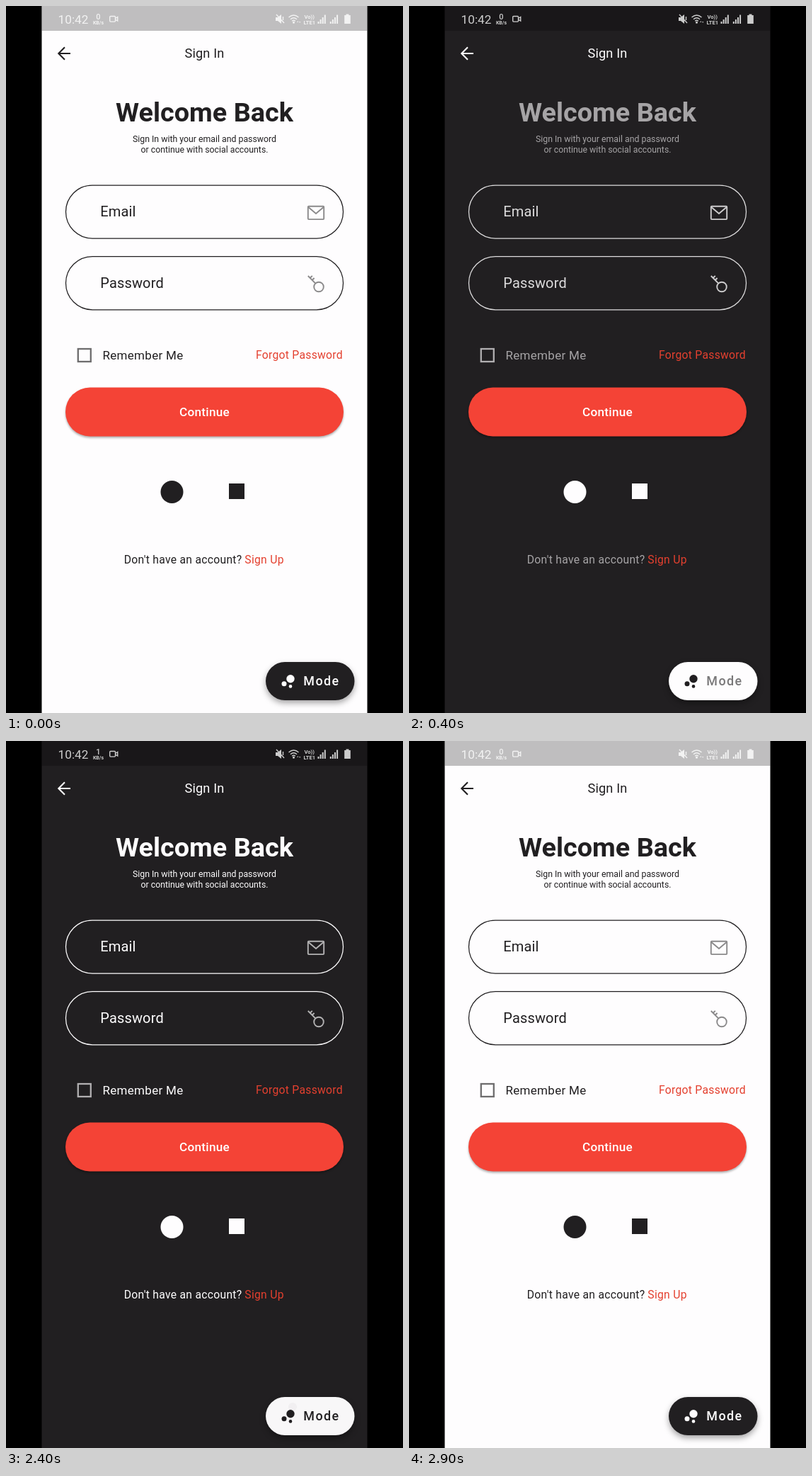
Recreate the animation shown at these times as an HTML page. Size 561x998 px, loop 4.2 s.

```html
<!DOCTYPE html>
<html lang="en">
<head>
<meta charset="utf-8">
<title>Sign In</title>
<style>
  html, body { margin: 0; width: 100%; height: 100%; overflow: hidden; background: #000; }
  svg { display: block; width: 561px; height: 998px; font-family: Roboto, sans-serif; }
  .mid { text-anchor: middle; }
  .line { fill: none; }
  .body { fill: var(--text); }
  .small { font-size: 12.3px; }
  .label { fill: var(--label); font-size: 20px; letter-spacing: .15px; }
  .box { stroke: var(--label); stroke-width: 1.25; }
  .icon { stroke: var(--icon); stroke-width: 1.9; }
  .note { font-size: 15.7px; letter-spacing: .28px; }
  .link { fill: #e4402f; }
  .fg { fill: var(--fg); }
  .status { fill: var(--status); }
  .status .line { stroke: var(--status); stroke-width: 1.4; }
  .tiny { font-size: 7.6px; font-weight: 700; }
  .button { fill: #f44336; filter: drop-shadow(0 2px 1.5px rgba(0, 0, 0, .32)); }
  .fab { fill: var(--fg); filter: drop-shadow(0 4px 4px rgba(0, 0, 0, .35)); }
</style>
</head>
<body>
<svg viewBox="0 0 561 998">
  <rect width="561" height="998"/>
  <rect x="50.5" width="460" height="998" fill="var(--bg)"/>
  <rect x="50.5" width="460" height="35" fill="#000" opacity=".25"/>

  <g class="status">
    <text x="73.6" y="25" font-size="17.2">10:42</text>
    <text id="rate" class="mid" x="130.5" y="18.5" font-size="11" font-weight="500"></text>
    <text class="mid tiny" x="130.5" y="26" style="font-size:7px">KB/s</text>
    <rect class="line" x="146.7" y="14.5" width="7.8" height="7.6" rx="1"/>
    <path class="line" d="M154.5 17.5l3.2-2v5.6l-3.2-2"/>
    <path d="M381 16h3l5-4v13l-5-4h-3z"/>
    <path class="line" d="M382 12l11 12M391.5 15v5"/>
    <path class="line" d="M399.5 16q7-6 14 0M402 18.7q4.5-4 9 0M404.2 21.2q2.3-2 4.6 0"/>
    <circle cx="406.5" cy="23.3" r="1.5"/>
    <path d="M411 23l1.2-2 1.2 2zM414 22h2.4l-1.2 2z" opacity=".8"/>
    <text class="tiny" x="421.5" y="17.5">Vo))</text>
    <text class="tiny" x="420.5" y="25.5">LTE1</text>
    <path id="bars" d="M440.5 22h2v3h-2zM443.6 19h2v6h-2zM446.7 16h2v9h-2zM449.8 12.5h2v12.5h-2z"/>
    <use href="#bars" x="17.3"/>
    <path d="M480.5 11.5h4v1.5h2.3v12h-8.6v-12h2.3z"/>
  </g>

  <path class="line" d="M91 67H75M83 58.3L74.3 67l8.7 8.7" stroke="var(--fg)" stroke-width="2.1"/>
  <text class="mid fg" x="280.5" y="73" font-size="18.2" letter-spacing=".15">Sign In</text>

  <g class="mid body">
    <text x="280.5" y="162.5" font-size="37.8" font-weight="700">Welcome Back</text>
    <text class="small" x="280.5" y="192">Sign In with your email and password</text>
    <text class="small" x="280.5" y="207">or continue with social accounts.</text>
  </g>

  <rect class="line box" x="84.5" y="253" width="392" height="75" rx="37.5"/>
  <text class="label" x="133.3" y="297">Email</text>
  <g class="line icon">
    <rect x="426.8" y="282.7" width="22.4" height="18.4" rx="1"/>
    <path d="M427.3 284l10.7 9 10.7-9"/>
  </g>

  <rect class="line box" x="84.5" y="353.5" width="392" height="75.3" rx="37.6"/>
  <text class="label" x="133.3" y="397.7">Password</text>
  <g class="line icon">
    <circle cx="442" cy="396.5" r="6.8"/>
    <path d="M437.3 391.7L426.8 381M429.6 384l3.2-3.2M432.6 387l3-3"/>
  </g>

  <rect class="line" x="101.8" y="484" width="18" height="18" stroke="var(--check)" stroke-width="2.3"/>
  <text class="body" x="136.5" y="498.6" font-size="17" letter-spacing=".3">Remember Me</text>
  <text class="note link" x="353" y="498">Forgot Password</text>

  <rect class="button" x="84" y="538.5" width="393" height="69" rx="34.5"/>
  <text class="mid" x="280.5" y="578.5" font-size="17.2" font-weight="500" letter-spacing=".25" fill="#fff">Continue</text>

  <circle class="fg" cx="234.5" cy="686" r="16"/>
  <rect class="fg" x="315" y="674" width="22" height="22"/>

  <text class="note body" x="166.8" y="787">Don't have an account?</text>
  <text class="note link" x="337.3" y="787">Sign Up</text>

  <clipPath id="pill"><rect x="367" y="926" width="125.5" height="54" rx="27"/></clipPath>
  <rect class="fab" x="367" y="926" width="125.5" height="54" rx="27"/>
  <g id="press" clip-path="url(#pill)" fill="var(--bg)">
    <rect x="367" y="926" width="126" height="54" opacity=".4"/>
    <circle id="ripple" cx="405" cy="940"/>
  </g>
  <g fill="var(--bg)">
    <circle cx="402" cy="949.7" r="5.7"/>
    <circle cx="393" cy="956.8" r="3.5"/>
    <circle cx="402" cy="960.4" r="2.3"/>
  </g>
  <text x="420.3" y="959" font-size="17.9" font-weight="500" letter-spacing="1.45" fill="var(--fabText)">Mode</text>
</svg>
<script>
  const LOOP = 4200, STEP = 100, TO_DARK = 100, TO_LIGHT = 2400;
  const PAPER = [254, 253, 254], INK = [33, 31, 33];
  // Progress per step: surfaces lead, field labels follow, text styles come last.
  const SURFACE = [0, .33, .83, 1, 1, 1];
  const LABEL = [0, .1, .475, .85, 1, 1];
  const TEXT = [0, .03, .23, .6, .94, 1];
  const ICON_BOOST = [0, .1, .24, .12, 0, 0];
  const RIPPLE_RADIUS = [6, 34], PRESS_OPACITY = [.06, .1];

  const $ = id => document.getElementById(id);
  const lerp = (a, b, k) => a + (b - a) * k;
  const mix = (a, b, k) => a.map((v, i) => lerp(v, b[i], k));

  function draw(now) {
    const t = Math.floor(now % LOOP / STEP) * STEP;
    const dark = t >= TO_DARK && t < TO_LIGHT;
    const since = dark ? t - TO_DARK : (t - TO_LIGHT + LOOP) % LOOP;
    const step = Math.min(5, since / STEP);
    const darkness = curve => dark ? curve[step] : 1 - curve[step];

    const surface = darkness(SURFACE), text = darkness(TEXT);
    const bg = mix(PAPER, INK, surface), fg = mix(INK, PAPER, surface);
    const colors = {
      bg, fg,
      text: mix(INK, PAPER, text),
      fabText: mix(PAPER, INK, text),
      label: mix(INK, PAPER, darkness(LABEL)),
      icon: mix(bg, fg, lerp(.52, .66, surface) + ICON_BOOST[step]),
      check: mix(bg, fg, .65),
      status: mix([242, 242, 242], [204, 204, 204], surface)
    };
    for (const name in colors)
      document.body.style.setProperty('--' + name, `rgb(${colors[name].map(Math.round)})`);

    $('press').setAttribute('opacity', PRESS_OPACITY[step] || 0);
    $('ripple').setAttribute('r', RIPPLE_RADIUS[step] || 0);
    $('rate').textContent = t >= 1800 && t < 2900 ? 1 : 0;
  }

  const start = performance.now();
  function tick() {
    draw(performance.now() - start);
    requestAnimationFrame(tick);
  }
  tick();
</script>
</body>
</html>
```
